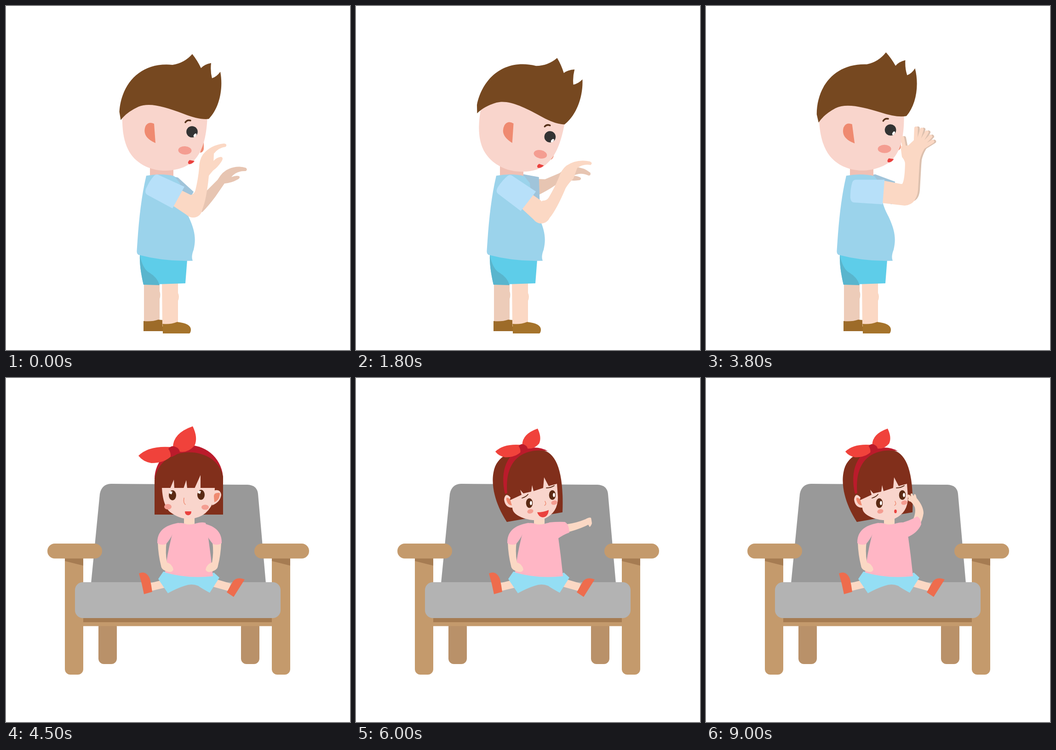
Recreate the animation shown at these times as an HTML page. Size 748 by 748 pixels, loop 9900 ms.

```html
<!DOCTYPE html>
<html lang="en">
<head>
<meta charset="utf-8">
<title>Boy and girl</title>
<style>
  html, body { margin: 0; width: 100%; height: 100%; overflow: hidden; background: #fff; }
  svg { display: block; width: 100%; height: 100%; }
  .skin { fill: #fbd8c4; stroke: #fbd8c4; stroke-width: 0; } .far-skin { fill: #e7c5b2; }
  .shade { fill: #dcc0ae; stroke: #dcc0ae; stroke-width: 0; } .face { fill: #f9d5cc; }
  .blush { fill: #f49d91; } .ear { fill: #ef8a70; } .mouth { fill: #ea413e; }
  .boy-hair { fill: #764820; } .girl-hair { fill: #812f1b; } .eye { fill: #5a2a14; }
  .pink { fill: #ffb6c5; } .red { fill: #f0423b; } .crimson { fill: #bb1b2b; } .shoe { fill: #ee6c4d; }
  .wood { fill: #c49a6c; } .wood-back { fill: #b99169; } .wood-dark { fill: #a67c52; }
  .line { fill: none; stroke-linecap: round; }
  .fingers { fill: none; stroke-width: 8; stroke-linecap: round; }
</style>
</head>
<body>
<svg viewBox="0 0 748 748">
  <defs>
    <g id="openHand">
      <path d="M433 345 Q434 338 426 328 L423 305 L440 303 L456 288 L482 300 Q464 324 464 345 Z"/>
      <path d="M433 330 H465 L461 400 Q459 425 440 426 L426 388 Q433 380 433 330 Z"/>
      <path id="fingers" class="fingers"/>
    </g>
    <g id="loweredArm">
      <path class="skin" d="M330 357 H349 Q346 380 350 401 Q362 405 364 417 Q360 424 352 421 Q338 418 337 408 Q331 385 330 357 Z"/>
      <path class="pink" d="M376 315 Q328 322 329 359 Q338 365 348 361 Q356 352 362 340 Z"/>
    </g>
    <g id="bow">
      <path class="red" d="M288 169 Q310 147 357 150 L360 169 Q345 185 316 185 Q298 182 288 169 Z M363 151 Q363 120 406 105 Q418 130 410 147 Q395 164 376 160 Z"/>
      <path class="crimson" d="M353 154 Q360 145 369 150 Q377 153 378 161 Q367 170 358 172 Q359 162 353 154 Z"/>
    </g>
  </defs>

  <g id="boy">
    <path id="farArm" class="far-skin" d="M400 415 L436 402 L460 378 Q471 359 485 354 Q503 346 522 352 Q526 357 521 359 Q501 358 490 372 Q500 368 507 370 Q510 374 504 377 Q490 385 475 386 L455 415 Q440 435 427 448 Q410 450 404 438 Z"/>
    <use id="farOpen" class="shade" href="#openHand"/>
    <path id="farSleeve" fill="#a0c4da" d="M364 371 L374 373 L408 404 L383 447 L345 415 Z"/>

    <path fill="#f0c0b4" d="M313 340 H364 V373 H313 Z"/>
    <path fill="#edccb9" d="M300 600 H334 V620 Q337 628 334 637 V692 H300 Z"/>
    <path fill="#9d6b29" d="M299 685 Q317 687 331 682 L342 683 V707 H299 Z"/>
    <path class="skin" d="M339 598 H374 V624 Q378 632 374 641 V697 H340 Z"/>
    <path fill="#a5732b" d="M340.5 691 Q357 693 372 687 Q402 690 402 704 Q402 709 399 712 H341 Z"/>
    <path fill="#5ecde9" d="M291 538 L394 552 L390 603 L299 606 Q290 568 291 541 Z"/>
    <path fill="#59b5cd" d="M291 541 Q297 572 312 580 Q329 590 334 607 L299 606 Q290 568 291 541 Z"/>

    <g id="boyHead">
      <g id="profile">
        <path class="ear" d="M430 290 V311 Q429 318 422 319 Z"/>
      </g>
      <path class="face" d="M253 235 C252 270 256 300 272 323 C292 350 325 359 348 358 C378 357 400 347 413 331 C428 313 436 285 438 240 Q340 160 253 235 Z"/>
      <path id="boyMouth" class="mouth" d="M399 335 L410 337 Q405 344 398 344 Q393 341 399 335 Z"/>
      <g id="boyFeatures">
        <path class="ear" d="M322 256 Q309 250 303 262 Q295 285 325 298 Z"/>
        <circle cx="404.5" cy="273.5" r="12.3" fill="#333"/>
        <ellipse cx="411" cy="281" rx="2.5" ry="4.3" fill="#fff" transform="rotate(35 411 281)"/>
        <path class="line" stroke="#553018" stroke-width="3.5" d="M390 253 Q394 247 401 249"/>
        <ellipse class="blush" cx="389" cy="314" rx="14.5" ry="9" transform="rotate(4 389 314)"/>
      </g>
      <path id="boyHair" class="boy-hair" d="M246.5 230 C250 172 290 121 362 128 Q388 124 405 104.5 Q416 118 424 135 Q431 127 446 124 Q444 142 448 157 Q458 154 466 143 C473 180 464 222 441 245.5 Q420 248 385 234 C345 219 312 209 288 219 Q262 231 249.5 248 Z"/>
    </g>

    <path fill="#9bd3eb" d="M305 369 Q340 363 366 370 L378 385 C382 430 388 440 397 458 C412 490 413 508 408 530 Q402 545 406 554 Q345 556 288 541 Q284 539 284.5 532 C288 475 293 420 305 369 Z"/>

    <g id="openArm" class="skin">
      <path d="M376 380 L388 380 L424 387 L461 388 Q462 432 432 434 L380 428 Z"/>
      <use id="nearOpen" href="#openHand"/>
    </g>
    <g id="forearm" class="skin">
      <circle cx="407" cy="440" r="20"/>
      <path d="M391 428 L401 411 Q410 409 412 400 Q418 375 420 352 Q420 335 428 323 Q445 302 474 299 Q482 300 478 306 Q462 308 452 321 L451 345 Q444 358 441 370 Q436 420 427 442 L407 445 Z"/>
      <path id="thumb" d="M449 339 Q459 328 468 328 Q474 330 468 339 Q460 351 450 358 L440 370 Z"/>
    </g>
    <g id="sleeve">
      <path id="upperArm" class="skin" d="M380 400 L386 403 L402 411 L422 432 L410 459 Q402 461 394 455 L364 435 Z"/>
      <path fill="#b7e0f9" d="M331 367 L388 393 L362 440 L308 411 Q301 408 304 398 Q312 380 322 369 Q326 365 331 367 Z"/>
    </g>
  </g>

  <g id="girl">
    <rect id="backLeg" class="wood-back" x="201" y="530" width="40" height="92" rx="12"/>
    <use href="#backLeg" x="310"/>
    <path fill="#999" d="M228 230 L525 232 Q546 233 548 252 L565 446 H185 L204 252 Q208 231 228 230 Z"/>
    <rect class="wood" x="160" y="528" width="430" height="11.5"/>
    <rect class="wood-dark" x="168" y="520" width="414" height="11"/>
    <g id="chairSide">
      <rect class="wood" x="128" y="380" width="40" height="265" rx="12"/>
      <path class="wood-dark" d="M128 390 H168 V408 L128 398 Z"/>
      <rect class="wood" x="90" y="360" width="119" height="32.5" rx="16"/>
    </g>
    <use href="#chairSide" x="450"/>
    <rect fill="#b3b3b3" x="150" y="444" width="447" height="78" rx="17"/>

    <path class="skin" d="M342 439 L313 446 L316 463 L345 456 Z M452 436 L489 447 L483 463 L447 453 Z M387 298 H410 V322 H387 Z"/>
    <path class="shoe" d="M289 425 Q305 418 313 437 Q316 450 318 465 L300 470 Q296 448 289 425 Z M480 466 L493 443 Q501 431 519 438 L495 476 Z"/>
    <path fill="#94def4" d="M342 421 L448 425 L452 423 L464 434 L443 467 Q423 456 418 452 Q404 446 388 452 Q372 457 352 468 L331 437 Z"/>
    <path class="pink" d="M370 316 Q385 314 389 317 Q398 320 410 317 Q425 312 434 315 L440 348 Q446 390 450 431 Q395 437 346 423 Q350 385 360 345 Z"/>
    <use href="#loweredArm"/>
    <use id="restArm" href="#loweredArm" transform="translate(798) scale(-1 1)"/>

    <g id="frontHead">
      <path class="crimson" d="M323 220 A74.5 74 0 0 1 472 220 Z"/>
      <path class="girl-hair" d="M323 297 V222 C335 140 460 145 472 215 V297 Z"/>
      <path class="face" d="M339 239 H454 L453 262 Q441 303 400 306.5 Q376 307 355 290 Q341 275 339 239 Z M357 240 L365 221 L366 240 Z M386 240 L392 222 L394 240 Z M410 240 L423 211 V240 Z M452 245 Q466 240 468 254 Q466 270 448 277 Z"/>
      <path class="ear" d="M465 250 Q452 248 452 257 L453 270 Q465 266 465 250 Z"/>
      <g id="frontEye">
        <ellipse class="eye" cx="362" cy="255" rx="8" ry="11"/>
        <path fill="#fff" d="M356 246 L362 247 L360 253 L355 251 Z"/>
      </g>
      <use href="#frontEye" x="62" y="-1"/>
      <path class="line" stroke="#ef8a70" stroke-width="1.5" d="M387 261 Q385 272 390 275"/>
      <ellipse class="blush" cx="352" cy="280" rx="8" ry="6"/>
      <ellipse class="blush" cx="433" cy="281" rx="8" ry="5.5"/>
      <path class="mouth" d="M389 290 H403 Q403 298 396 298.5 Q389 298 389 290 Z"/>
      <use href="#bow"/>
    </g>

    <g id="sideHead">
      <path class="girl-hair" d="M328 313 C300 270 294 230 299 205 C306 165 345 155 385 157 C430 148 453 190 449 292 Z"/>
      <path class="crimson" d="M324 252 C312 200 330 160 365 155 Q395 146 417 159 C372 152 322 170 329 250 Z"/>
      <path class="face" d="M334 266 L360 254 L357 243 L364 251 L381 247 L383 233 L386 246 L407 239 L409 216 L419 235 L437 230 L439 258 Q440 292 410 306 Q390 313 365 305 Q340 296 340 282 Q324 282 322 264 Q325 247 336 260 Z"/>
      <path class="ear" d="M335 264 Q326 256 327 265 Q330 277 339 277 Z"/>
      <g id="sideEye">
        <ellipse class="eye" cx="377" cy="272" rx="7.3" ry="10.5"/>
        <ellipse fill="#fff" cx="380.5" cy="272" rx="2.4" ry="4.4"/>
      </g>
      <use href="#sideEye" x="50" y="-17.5"/>
      <path class="line" stroke="#5a2a14" stroke-width="1.8" d="M361 261 Q369 259 374 253 M414 239 Q424 239 431 234"/>
      <path class="line" stroke="#ef8a70" stroke-width="1.5" d="M411 268 Q415 275 410 277"/>
      <ellipse id="sideCheek" class="blush" cx="379" cy="290" rx="6.7" ry="4.7" transform="rotate(-15 379 290)"/>
      <use href="#sideCheek" x="52" y="-19"/>
      <path id="smile" class="mouth" d="M394 292 Q408 292 419 287 Q418 302 406 303 Q397 302 394 292 Z"/>
      <ellipse id="pout" class="mouth" cx="412" cy="290" rx="2.8" ry="4"/>
      <use href="#bow" transform="translate(363 153) scale(.78) translate(-365 -160)"/>
    </g>

    <g id="pointArm">
      <path class="skin" d="M458 318 Q480 315 499 307 Q507 302 511 304 L512 309 L513 316 Q511 322 508 324 L505 319 L499 322 Q481 330 458 336 Z"/>
      <path class="pink" d="M420 314 Q440 312 454 313 Q463 317 464 336 Q450 341 438 350 Z"/>
    </g>
    <g id="cheekArm">
      <path id="cheekForearm" class="skin" d="M450 308 Q457 293 454 281 Q450 273 445 269 Q437 267 440 262 L438 255 Q441 251 446 258 Q443 250 448 251 L452 257 Q452 250 456 254 L458 261 Q473 279 473 294 Q471 309 464 320 Z"/>
      <path class="pink" d="M420 316 Q440 312 459 301 Q467 304 468 318 Q460 337 438 346 Z"/>
    </g>
  </g>
</svg>

<script>
const LOOP = 9900, GIRL_START = 4500, STEP = 200;
const part = Object.fromEntries([...document.querySelectorAll('[id]')].map(e => [e.id, e]));

// Progress of a gesture from 0 to 1, advancing in discrete steps from its start.
const ramp = (t, from, to) =>
  Math.min(1, Math.max(0, Math.floor((t - from) / STEP) * STEP / (to - from)));
const bump = (t, from, to) => Math.sin(Math.PI * ramp(t, from, to));

const show = (on, ...names) =>
  names.forEach(name => part[name].setAttribute('display', on ? 'inline' : 'none'));
const move = (name, angle, [px, py], dx = 0, dy = 0) =>
  part[name].setAttribute('transform', `translate(${dx} ${dy}) rotate(${angle} ${px} ${py})`);

const ORIGIN = [0, 0], NECK = [338, 360], SHOULDER = [353, 385], ELBOW = [407, 440], FAR_ELBOW = [420, 440];

// Five fingers fanned out from the palm, plus the thumb.
function fingerPath() {
  let d = 'M433 318 L427 287';
  for (let i = 0; i < 5; i++) {
    const angle = (88 - 14 * i) * Math.PI / 180, length = 52 - i * i / 2;
    d += ` M455 318 l${length * Math.cos(angle)} ${-length * Math.sin(angle)}`;
  }
  return d;
}
part.fingers.setAttribute('d', fingerPath());

function drawBoy(t) {
  const reach = ramp(t, 0, 1000), down = ramp(t, 1200, 1800), raise = ramp(t, 1800, 2400);
  const lean = down - raise;

  const look = 6 * down - 4 * raise;
  move('boyHead', 8 * down - 11.5 * raise, NECK);
  move('boyFeatures', 0, ORIGIN, look);
  move('boyMouth', 0, ORIGIN, -4 * lean);
  move('profile', 0, ORIGIN, -6 * down + 3 * raise, 4 * lean);
  move('boyHair', 0, ORIGIN, 5 * raise - 3 * down, -3 * lean);

  const turn = 9 * down - 33.5 * raise, shift = 5 * lean;
  move('sleeve', turn, SHOULDER, shift, shift);
  const elbow = new DOMMatrix().rotate(turn)
    .transformPoint({ x: ELBOW[0] - SHOULDER[0], y: ELBOW[1] - SHOULDER[1] });
  move('forearm', 5.8 * reach + 11.4 * down - 32 * raise, ELBOW,
    SHOULDER[0] + elbow.x - ELBOW[0] + shift, SHOULDER[1] + elbow.y - ELBOW[1] + shift);

  move('farArm', -4.8 * reach + 26.8 * down - 52 * raise, FAR_ELBOW, 43 * raise - 38 * down, -34 * down);
  move('farSleeve', 10 * raise - 32 * down, SHOULDER, -12 * lean);

  const open = t >= 2200, lift = -12 * bump(t, 2400, 3800), settle = 24.5 + turn;
  move('openArm', settle, SHOULDER);
  move('nearOpen', 0, ORIGIN, 0, lift);
  move('farOpen', settle, SHOULDER, 4, lift);
  show(open, 'openArm', 'farOpen');
  show(!open, 'forearm', 'farArm', 'upperArm');
  show(t < 1600, 'thumb');
}

function drawGirl(t) {
  const turned = t >= 5400, cheek = t >= 6800, resting = t < 5000;
  show(!turned, 'frontHead');
  show(turned, 'sideHead');
  show(!cheek, 'smile');
  show(cheek, 'pout', 'cheekArm');
  show(resting, 'restArm');
  show(!resting && !cheek, 'pointArm');
  move('pointArm', 66 * (1 - ramp(t, 4800, 6000)) - 25 * ramp(t, 6000, 6600), [437, 330]);
  const wave = 36 * (1 - ramp(t, 6800, 7400)) + 8 * bump(t, 7700, 8300) + 4 * bump(t, 8600, 9000);
  move('cheekForearm', wave, [461, 309]);
}

const start = performance.now();
function tick() {
  const t = (performance.now() - start) % LOOP;
  const girlOn = t >= GIRL_START;
  show(!girlOn, 'boy');
  show(girlOn, 'girl');
  (girlOn ? drawGirl : drawBoy)(t);
  requestAnimationFrame(tick);
}
tick();
</script>
</body>
</html>
```
